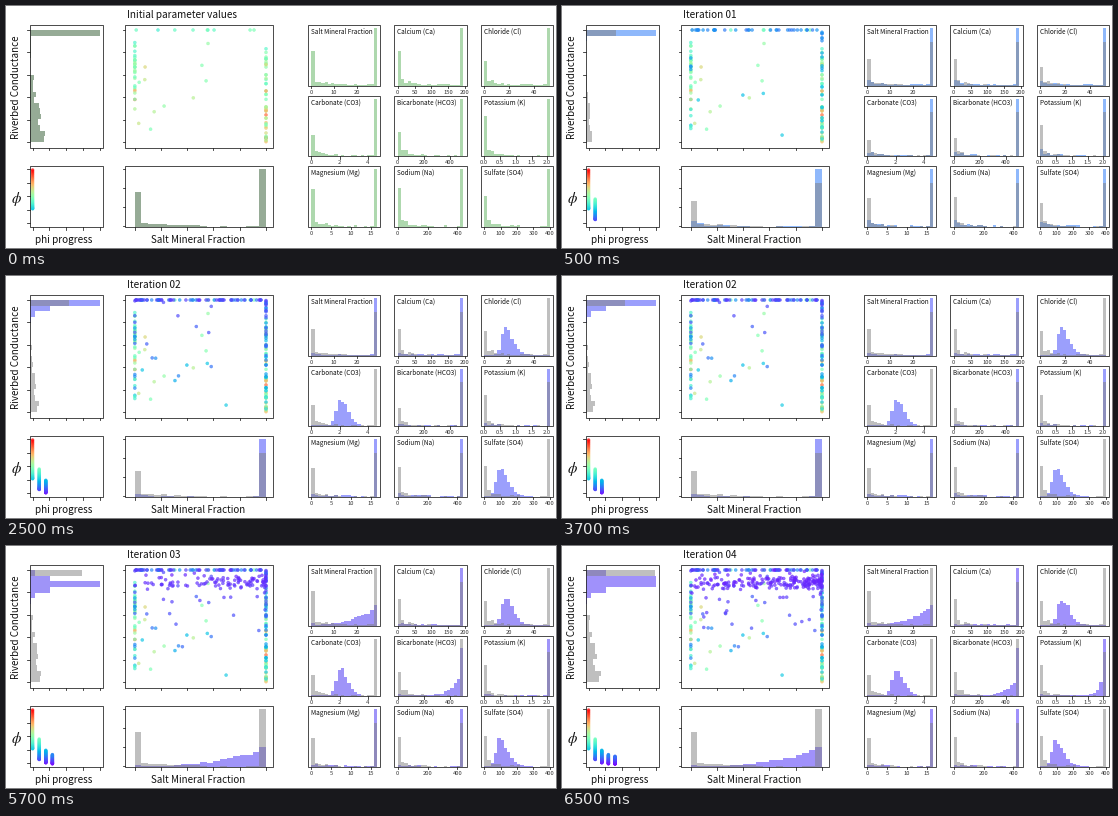
Write a matplotlib script that moves like this. It is 550 px wide and 242 px high and loops after 8000 ms.

```python
import numpy as np
import matplotlib.pyplot as plt
from matplotlib.animation import FuncAnimation
from matplotlib.patches import Rectangle

W, H, DPI = 550, 242, 100
PX = 72 / DPI
INTERVAL, FRAMES = 500, 16
FIRST_HOLD, HOLD = 500, 2000
BINS = 20
K = np.arange(BINS)
GRAY = (0.5, 0.5, 0.5, 0.5)
TINTS = ["#aed8ae", "#8fb8fb", "#9b9ffc", "#9f94f8", "#a091fb"]
TITLES = ["Initial parameter values"] + [f"Iteration {i:02d}" for i in range(1, 5)]
CMAP = plt.get_cmap("rainbow")

plt.rcParams["font.family"] = "Noto Sans CJK JP"
plt.rcParams["mathtext.fontset"] = "stix"

fig = plt.figure(figsize=(W / DPI, H / DPI), dpi=DPI, facecolor="white")
ax = fig.add_axes([0, 0, 1, 1])
ax.set_xlim(0, W)
ax.set_ylim(H, 0)
ax.axis("off")
ax.set_autoscale_on(False)
steps = [[] for _ in TITLES]


def label(x, y, text, size, ha="center", va="center_baseline", color="#111111", **kw):
    return ax.text(x, y, text, fontsize=size * PX, ha=ha, va=va, color=color, **kw)


def panel(x0, y0, x1, y1, xticks=(), yticks=()):
    ax.add_patch(Rectangle((x0, y0), x1 - x0, y1 - y0, fill=False,
                           ec="#222222", lw=0.8 * PX, zorder=5))
    style = dict(color="#222222", lw=0.8 * PX)
    for x in xticks:
        ax.plot([x, x], [y1, y1 + 2.6], **style)
    for y in yticks:
        ax.plot([x0 - 2.6, x0], [y, y], **style)


def bars(step, x, base, width, heights, color, z):
    size = width / BINS
    steps[step] += ax.bar(x + size * K, -heights, size, bottom=base,
                          align="edge", color=color, lw=0, zorder=z)


def hbars(step, widths, color, z):
    steps[step] += ax.barh(24.3 + 5.57 * K, widths, 5.57, left=23.5,
                           align="edge", color=color, lw=0, zorder=z)


# Histogram profiles, one height per bin with 1 as the tallest
def edge(first, tail, rng):
    h = tail * np.exp(-K / 3) * rng.uniform(0.5, 1.2, BINS)
    h += 0.02 * (rng.random(BINS) > 0.6)
    h[0], h[-1] = first, 1
    return h


def bump(center, rng):
    offset = (K + 0.5) / BINS - center
    spread = np.where(offset < 0, 0.055, 0.12)
    h = 0.48 * np.exp(-(offset / spread) ** 2 / 2)
    return h * rng.uniform(0.8, 1.05, BINS) + 0.015 * (K < 15)


def ramp(power, rng):
    h = 0.3 * (K / (BINS - 2)) ** power * rng.uniform(0.65, 1.05, BINS) + 0.015
    h[0], h[-1] = 0.04, min(1, 0.14 * power)
    return h


# title, axis maximum, tick spacing, first bin, later shape (kind, value, from step)
VARS = [
    ("Salt Mineral Fraction", 28.8, 10, 0.60, (ramp, 2.5, 3)),
    ("Calcium (Ca)", 195, 50, 0.60, None),
    ("Chloride (Cl)", 53, 20, 0.42, (bump, 0.32, 2)),
    ("Carbonate (CO3)", 4.65, 2, 0.36, (bump, 0.43, 2)),
    ("Bicarbonate (HCO3)", 505, 200, 0.42, (ramp, 6, 3)),
    ("Potassium (K)", 2.08, 0.5, 0.70, (ramp, 14, 4)),
    ("Magnesium (Mg)", 16.5, 5, 0.65, None),
    ("Sodium (Na)", 440, 200, 0.67, None),
    ("Sulfate (SO4)", 400, 100, 0.53, (bump, 0.24, 2)),
]


def profiles(var, step):
    """Return the current and the prior histogram."""
    first, later = VARS[var][3:]
    prior = edge(first, 0.14, np.random.default_rng(var))
    if step == 0:
        return prior, prior
    rng = np.random.default_rng(20 * step + var)
    if later and step >= later[2]:
        kind, value, _ = later
        now = kind(value, rng)
    else:
        now = edge(0.17 * first / step, 0.08 / step, rng)
    return now, prior * (0.76 if now.max() > 0.95 else 1)


# Small panels
for i, (name, top, spacing, *_) in enumerate(VARS):
    x0, y0 = 302 + 86.4 * (i % 3), 19 + 70.6 * (i // 3)
    y1 = y0 + 60.5
    values = np.arange(0, top * 1.03, spacing)
    xs = x0 + 3.4 + 65.6 * values / top
    panel(x0, y0, x0 + 72.4, y1, xs)
    for x, v in zip(xs, values):
        label(x, y1 + 6, f"{v:.1f}" if spacing < 1 else f"{v:.0f}", 5.8, color="#333333")
    label(x0 + 3, y0 + 5.8, name, 6.4, "left", zorder=6)
    for s, tint in enumerate(TINTS):
        now, prior = profiles(i, s)
        bars(s, x0 + 3.4, y1, 65.6, 57.6 * now, tint, 1)
        if s:
            bars(s, x0 + 3.4, y1, 65.6, 57.6 * prior, GRAY, 2)

# Large panels
param_x = np.linspace(128.5, 260, 6)
param_y = np.linspace(24, 136, 6)
phi_x = np.linspace(26.5, 94, 5)
panel(23.5, 19, 97, 141.7, phi_x, param_y)
panel(119.3, 19, 266.5, 141.7, param_x, param_y)
panel(23.5, 160, 97, 221, phi_x, np.linspace(163, 217, 5))
panel(119.3, 160, 266.5, 221, param_x, np.linspace(163, 220, 4))
label(10.5, 81.5, "Riverbed Conductance", 9.8, rotation=90, va="center")
label(10.5, 190, r"$\phi$", 15)
label(57.3, 233, "phi progress", 10)
label(192, 233, "Salt Mineral Fraction", 9.8)


def river_now(step):
    """Spread around a centre that moves down from the upper bound."""
    center = (0, 0, 2, 1.5)[step - 1]
    distance = abs(K - center)
    return 70 * np.exp(-(4 if step == 1 else 1.25) * (distance - distance.min()))


rng = np.random.default_rng(6)
depth = np.clip((K - 8) / 11, 0, 1)
river = (K >= 8) * (4 + 11 * depth ** 1.4) * rng.uniform(0.7, 1.25, BINS) + (K < 5)
river[0] = 70
for s, tint in enumerate(TINTS):
    hbars(s, river_now(s) if s else river, tint, 1)
    hbars(s, river * (0.43 * 1.32 ** (s - 1) if s else 1), GRAY, 2)
    now, prior = profiles(0, s)
    bars(s, 128.5, 221, 131.5, 58 * now, tint, 1)
    bars(s, 128.5, 221, 131.5, 58 * prior, GRAY, 2)


def ensemble(step):
    """Points (x, y, phi) on the unit square, y pointing down."""
    rng = np.random.default_rng(40 + step)
    rand = rng.random
    if step < 3:
        left, right, top, inner = [(28, 46, 9, 11), (9, 24, 32, 4), (8, 22, 34, 12)][step]
        x = np.r_[np.zeros(left), np.ones(right), rand(top) ** 1.6, 0.7 * rand(inner)]
        low = 0.1 if step == 0 else 0
        y = np.r_[rand(left), low + (1 - low) * rand(right) ** (0.75 + 0.4 * step),
                  np.zeros(top), rand(inner) ** (1 + 0.3 * step)]
    else:
        band, loose = 95, 18
        x = np.r_[1 - rand(band) ** 1.8, rand(loose)]
        y = np.r_[rng.normal(0.115, 0.03, band), 0.7 * rand(loose) ** 1.3]
    y = np.clip(y, 0, 1)
    base = 0.07 + 0.33 * np.exp(-step)
    wide = np.exp(-0.8 * step)
    phi = base + 0.12 * y + wide * (0.12 * rand(len(x)) + 0.5 * y * rand(len(x)) ** 3)
    return x, y, phi


def shade(phi):
    return CMAP(1.05 * phi - 0.05)


# The cloud and the phi columns grow with every iteration
for s, title in enumerate(TITLES):
    x, y, phi = ensemble(s)
    cloud = ax.scatter(128.8 + 131.2 * x, 24 + 112 * y, s=4.8, c=shade(phi),
                       alpha=0.68, lw=0.3, zorder=3)
    low = 0.05 + 0.27 * np.exp(-1.2 * s)
    high = 0.17 + 0.83 * np.exp(-0.95 * s)
    t = low + (high - low) * np.linspace(0, 1, 40) ** 1.4
    column = ax.scatter(np.full(len(t), 26.6 + 6.6 * s), 221 - 57 * t, s=6,
                        c=shade(t), alpha=0.75, lw=0, zorder=3)
    for later in steps[s:]:
        later += [cloud, column]
    steps[s].append(label(121.3, 8, title, 10, "left"))


def update(frame):
    time = frame * INTERVAL
    current = 0 if time < FIRST_HOLD else 1 + (time - FIRST_HOLD) // HOLD
    for group in steps:
        for artist in group:
            artist.set_visible(False)
    for artist in steps[current]:
        artist.set_visible(True)
    return steps[current]


anim = FuncAnimation(fig, update, frames=FRAMES, init_func=lambda: update(0),
                     interval=INTERVAL, repeat=True, repeat_delay=0, blit=False)
plt.show()
```
